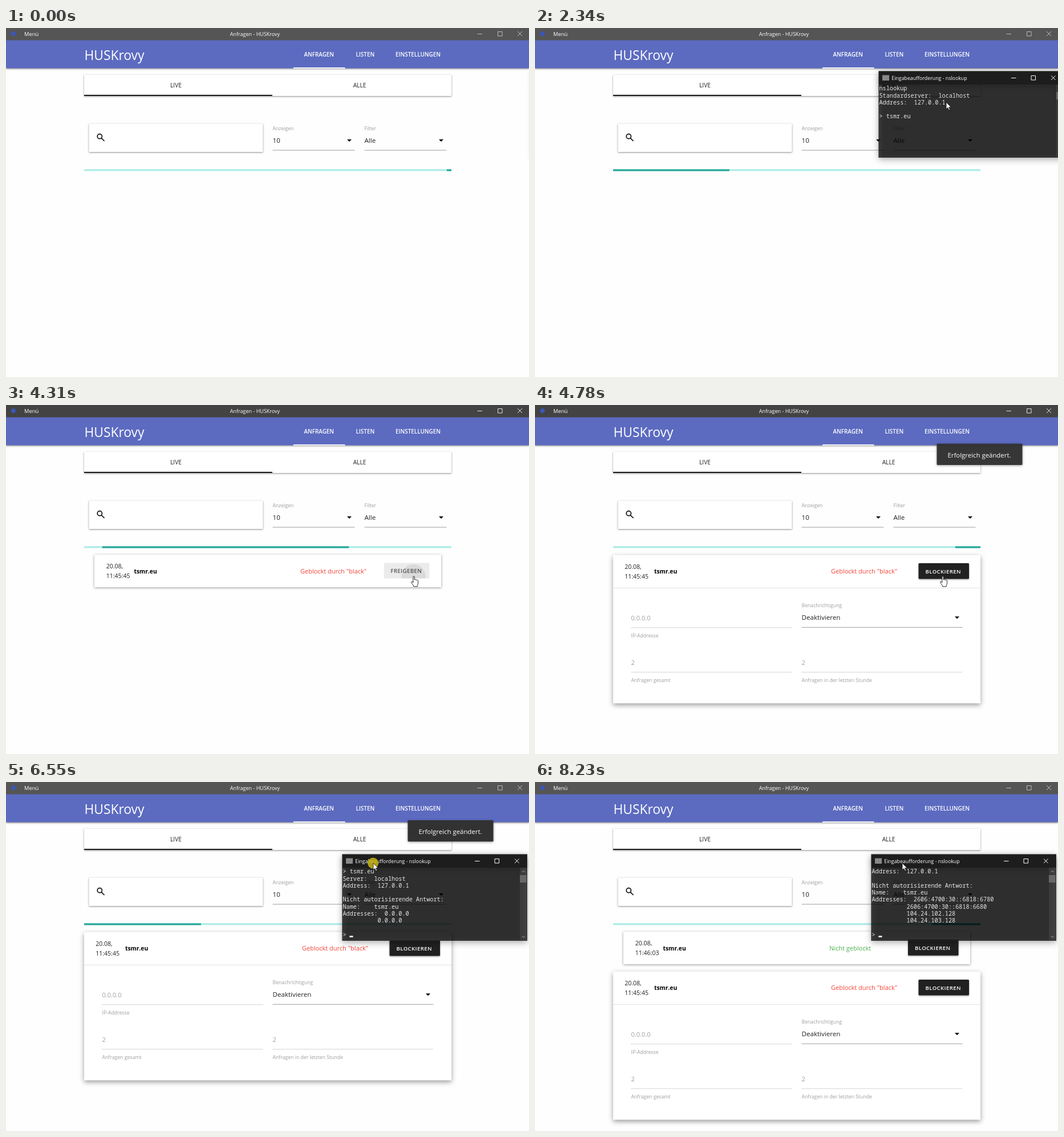
An HTML page that plays this animation: 917 by 611 pixels, repeating every 9.11 s.

```html
<!DOCTYPE html>
<html lang="de">
<head>
<meta charset="utf-8">
<title>Anfragen - HUSKrovy</title>
<style>
  html, body { margin: 0; width: 100%; height: 100%; overflow: hidden; background: #fefefe; }
  #stage { display: block; width: 917px; height: 611px; font: 10.2px "Open Sans", "Noto Sans", sans-serif; fill: #212121; }
  text { white-space: pre; }
  .light, .light text { fill: #fff; }
  .nav { font-size: 9.9px; font-weight: 600; }
  .label { font-size: 8.7px; fill: #9e9e9e; }
  .value { font-size: 11.6px; }
  .muted { font-size: 11px; fill: #9e9e9e; }
  .date { font-size: 10.5px; }
  .domain { font-size: 10.3px; font-weight: 700; fill: #000; }
  .status { font-size: 11px; }
  .button { font-size: 9.8px; letter-spacing: .4px; }
  .button.dark { font-size: 9.6px; font-weight: 600; filter: drop-shadow(0 1px 1.5px rgba(0,0,0,.4)); }
  .paper { fill: #fff; filter: drop-shadow(0 1px 1.5px rgba(0,0,0,.45)); }
  .line { stroke: #9e9e9e; fill: none; }
  .dots { stroke: #aaa; stroke-dasharray: 1 1; fill: none; }
  .icon { stroke: #fff; fill: none; }
  .mono { font: 10.2px "Noto Sans Mono", "DejaVu Sans Mono", monospace; fill: #e6e6e6; }
  #toast { filter: drop-shadow(0 1.5px 2px rgba(0,0,0,.4)); }
  #frame { filter: drop-shadow(0 3px 6px rgba(0,0,0,.45)); }
</style>
</head>
<body>
<svg id="stage" viewBox="0 0 917 611">
  <rect y="21" width="917" height="49.5" fill="#5c6bc0" style="filter:drop-shadow(0 1.2px 1.5px rgba(0,0,0,.5))"/>
  <rect id="titlebar" width="917" height="21.5"/>
  <circle cx="13" cy="10" r="4" fill="#3a57b8"/>
  <g class="light">
    <text x="32" y="13.5" font-size="9.4">Menü</text>
    <text x="436.5" y="13.5" font-size="9" text-anchor="middle">Anfragen - HUSKrovy</text>
    <text x="137.5" y="56" font-size="22.8">HUSKrovy</text>
    <g class="nav">
      <text x="522.5" y="49.7">ANFRAGEN</text>
      <text x="613.5" y="49.7">LISTEN</text>
      <text x="683" y="49.7">EINSTELLUNGEN</text>
    </g>
    <rect x="504" y="69" width="90.5" height="1.8"/>
  </g>
  <path id="controls" class="icon" d="M826.5 10.5h8.5M862.5 6.5h7.5v7.5h-7.5zM897 6l8 8m0-8l-8 8"/>

  <rect class="paper" x="137" y="82" width="644" height="37"/>
  <text x="298" y="104" text-anchor="middle">LIVE</text>
  <text x="620" y="104" text-anchor="middle">ALLE</text>
  <rect x="137" y="117" width="330" height="1.8" fill="#000"/>

  <rect class="paper" x="145.5" y="167.5" width="305" height="49.5"/>
  <g fill="none" stroke="#111" stroke-width="1.7">
    <circle cx="164.3" cy="189.8" r="4.1"/><path d="M167.3 192.8l5.2 5.2"/>
  </g>
  <g id="selects"></g>

  <rect x="137" y="247.2" width="644" height="3.2" fill="#acece6"/>
  <svg x="137" y="247.2" width="644" height="3.2" fill="#26a69a">
    <rect id="long" height="4"/><rect id="short" height="4"/>
  </svg>
  <g id="cards"></g>
  <g id="toast">
    <rect x="704.5" y="67" width="150" height="37.3" rx="1.5" fill="#323232"/>
    <text class="light" x="723.5" y="91" font-size="11.4">Erfolgreich geändert.</text>
  </g>

  <g id="terminal">
    <g id="frame">
      <rect x="-.5" y="23" width="324.5" height="128" fill="#000" fill-opacity=".735"/>
      <rect x="-.5" y="-.5" width="324.5" height="23.5" fill="#1d1d1d"/>
    </g>
    <rect width="323.5" height="150.5" fill="none" stroke="#333" stroke-opacity=".7"/>
    <rect x="6" y="6.5" width="12" height="9.5" fill="#888"/>
    <text class="light" x="22.3" y="14.8" font-size="8.8">Eingabeaufforderung - nslookup</text>
    <path class="icon" d="M232 11.5h8.5M267 7.5h7.5v7.5h-7.5zM302 7.5l7.5 7.5m0-7.5l-7.5 7.5"/>
    <rect x="311" y="23" width="12.5" height="127" fill="#555" fill-opacity=".35"/>
    <rect x="311" y="36" width="11.5" height="13" fill="#686868"/>
    <path class="icon" style="stroke:#aaa" d="M314.5 31l2.7-2.7 2.7 2.7M314.5 142.5l2.7 2.7 2.7-2.7"/>
    <g id="console" class="mono"></g>
    <rect id="caret" width="6.2" height="2.6" fill="#fff"/>
  </g>

  <g id="pointer">
    <circle id="press" cx="-.5" r="9.5" fill="#c8b414" fill-opacity=".85"/>
    <path id="arrow" d="M0 0v12l2.8-2.6 1.9 4.2 1.9-.8-1.9-4.1h3.8z" fill="#fff" stroke="#111" stroke-width=".8"/>
    <path id="hand" d="M-1.2 1c0-1.6 2.4-1.6 2.4 0v5c.4-1 2.2-.9 2.3.3.5-.8 2-.6 2.1.5.6-.6 1.9-.2 1.9 1v4c0 2-1 2.6-1.2 6h-6.6c-.3-2.8-2.6-4.2-4-7-.7-1.4 1.1-2.4 2-1.2l1.1 1.4z" fill="#fff" stroke="#111" stroke-width=".9"/>
  </g>
</svg>
<script>
const LOOP = 9110, STEP = 78.1, LAST = 105 * STEP, BAR_WIDTH = 644;
const el = id => document.getElementById(id);
const set = (node, attrs) => { for (const k in attrs) node.setAttribute(k, attrs[k]); };
const show = (node, on) => { node.style.display = on ? '' : 'none'; };
const move = (node, x, y) => set(node, { transform: `translate(${x} ${y})` });
const clamp = v => Math.max(0, Math.min(1, v));
const lerp = (a, b, p) => a + (b - a) * p;
const smooth = p => p * p * (3 - 2 * p);
const easeOut = p => 1 - (1 - p) ** 3;

function bezier(x1, y1, x2, y2) {
  const at = (a, b, s) => 3 * (1 - s) ** 2 * s * a + 3 * (1 - s) * s * s * b + s ** 3;
  return x => {
    let lo = 0, hi = 1;
    for (let i = 0; i < 24; i++) {
      const mid = (lo + hi) / 2;
      if (at(x1, x2, mid) < x) lo = mid; else hi = mid;
    }
    return at(y1, y2, lo);
  };
}

// Keys are [time, x, y]
function track(keys, t) {
  const i = keys.findIndex(k => k[0] > t);
  if (i === 0) return keys[0].slice(1);
  if (i < 0) return keys[keys.length - 1].slice(1);
  const [a, b] = [keys[i - 1], keys[i]];
  const p = smooth((t - a[0]) / (b[0] - a[0]));
  return [lerp(a[1], b[1], p), lerp(a[2], b[2], p)];
}

const select = (x, y, width, label, value) => `
  <text class="label" x="${x}" y="${y - 35}">${label}</text>
  <text class="value" x="${x}" y="${y - 13}">${value}</text>
  <path class="line" d="M${x} ${y}h${width}"/>
  <path d="M${x + width - 13.5} ${y - 19}h8l-4 4z" fill="#000"/>`;

const field = (x, y, width, value, label) => `
  <text class="muted" x="${x}" y="${y - 13}">${value}</text>
  <path class="dots" d="M${x} ${y}h${width}"/>
  <text class="label" x="${x}" y="${y + 17}">${label}</text>`;

el('selects').innerHTML = select(467.5, 214, 144, 'Anzeigen', '10') + select(628.5, 214, 144, 'Filter', 'Alle');

function addCard(time, status, color) {
  const root = document.createElementNS('http://www.w3.org/2000/svg', 'g');
  root.innerHTML = `
    <rect class="paper"/>
    <g class="date"><text y="24">20.08,</text><text y="41">${time}</text></g>
    <text class="domain" y="32.5">tsmr.eu</text>
    <text class="status" y="32.5" fill="${color}">${status}</text>
    <svg class="button" y="14.2" height="27.5">
      <rect width="100%" height="27.5" rx="1.5"/>
      <circle cx="52" cy="24" fill="#000" fill-opacity=".07"/>
      <text x="12" y="17.5"></text>
    </svg>
    <svg class="details" y="57" width="644">
      <path d="M0 .5h644" stroke="#ddd"/>
      ${field(31.5, 70, 282.5, '0.0.0.0', 'IP-Addresse')}
      ${select(330.5, 69.5, 282, 'Benachrichtigung', 'Deaktivieren')}
      ${field(31.5, 148, 282.5, '2', 'Anfragen gesamt')}
      ${field(330.5, 148, 282, '2', 'Anfragen in der letzten Stunde')}
    </svg>`;
  el('cards').append(root);
  const part = s => root.querySelector(s);
  return { root, paper: part('.paper'), date: part('.date'), domain: part('.domain'), status: part('.status'),
    button: part('.button'), face: part('.button rect'), ripple: part('circle'), caption: part('.button text'),
    details: part('.details') };
}

function drawCard(card, y, open, blocked, hover, ripple) {
  const width = lerp(608, 644, open), buttonWidth = blocked ? 88.5 : 80;
  move(card.root, lerp(155, 137, open), y + open * .8);
  set(card.paper, { width, height: lerp(57, 259.5, open) });
  card.paper.style.filter = `drop-shadow(0 ${1 + 2 * open}px ${2 + 2 * open}px rgba(0,0,0,.4))`;
  move(card.date, lerp(20.8, 20.3, open), 0);
  set(card.domain, { x: lerp(69.5, 72, open) });
  set(card.status, { x: lerp(361, 382, open) });
  set(card.button, { x: lerp(587.5, 624, open) - buttonWidth, width: buttonWidth });
  card.button.classList.toggle('dark', blocked);
  set(card.face, { fill: blocked ? '#212121' : hover ? '#ebebeb' : '#fff' });
  set(card.ripple, { r: blocked ? 0 : ripple });
  set(card.caption, { fill: blocked ? '#fff' : '#212121' });
  card.caption.textContent = blocked ? 'BLOCKIEREN' : 'FREIGEBEN';
  set(card.details, { height: 202.5 * open });
  show(card.details, open > 0);
}

const firstCard = addCard('11:45:45', 'Geblockt durch "black"', '#f44336');
const secondCard = addCard('11:46:03', 'Nicht geblockt', '#4caf50');

const longEase = bezier(.65, .815, .735, .395), shortEase = bezier(.165, .84, .44, 1);
function drawBar(node, time, ease, left, right) {
  const p = ease(clamp(time / 1260));
  const start = lerp(left[0], left[1], p), end = 100 - lerp(right[0], right[1], p);
  set(node, { x: start / 100 * BAR_WIDTH, width: (end - start) / 100 * BAR_WIDTH });
}

// The bar runs slightly fast and jumps at the two cuts
function drawProgress(t) {
  const phase = (t * 1.012 + (t < 4280 ? 2005 : t < 6180 ? 1292 : 1938)) % 2100;
  drawBar(el('long'), phase, longEase, [-35, 100], [100, -90]);
  drawBar(el('short'), (phase + 950) % 2100, shortEase, [-200, 107], [100, -8]);
}

const INTRO = ['nslookup', 'Standardserver:  localhost', 'Address:  127.0.0.1', ''];
const QUERY = '> tsmr.eu', PROMPT = '> ', INDENT = ' '.repeat(10);
const reply = addresses => ['Server:  localhost', 'Address:  127.0.0.1', '', 'Nicht autorisierende Antwort:',
  'Name:    tsmr.eu', ...addresses.map((a, i) => (i ? INDENT : 'Addresses:  ') + a), ''];
const BLOCKED = reply(['0.0.0.0', '0.0.0.0']);
const ALLOWED = reply(['2606:4700:30::6818:6780', '2606:4700:30::6818:6680', '104.24.102.128', '104.24.103.128']);
const ROWS = 10, ROW_HEIGHT = 12.25, CHAR_WIDTH = 6.135;
el('console').innerHTML = Array.from({ length: ROWS }, (_, i) => `<text x=".5" y="${33.3 + i * ROW_HEIGHT}"></text>`).join('');

function drawConsole(t) {
  const lines = [...INTRO, QUERY];
  if (t >= 2600) lines.push(...BLOCKED, t < 6850 ? PROMPT : QUERY);
  if (t >= 7150) lines.push(...ALLOWED, PROMPT);
  const visible = lines.slice(-ROWS);
  [...el('console').children].forEach((row, i) => row.textContent = visible[i] || '');
  set(el('caret'), { x: visible[visible.length - 1].length * CHAR_WIDTH, y: 32 + (visible.length - 1) * ROW_HEIGHT });
  const waiting = (t > 2030 && t < 2600) || (t > 7000 && t < 7150);
  show(el('caret'), !waiting);
}

const WINDOW_PATH = [[90, 925, 73], [937, 660, 81], [1550, 603, 76], [2950, 603, 76], [3420, 930, 85], [5850, 930, 135], [6320, 590, 127]];
const POINTER_PATH = [[1550, 725, 95], [1900, 721, 130], [2750, 721, 130], [2950, 725, 95], [3420, 960, 180],
  [3780, 765, 285], [4000, 715, 300], [5200, 715, 300], [5500, 960, 280], [6600, 644, 142]];
// [from, until, grab x, grab y]
const DRAGS = [[0, 1550, 122, 19], [2950, 3420, 122, 19], [5850, 6700, 54, 15]];

function drawPointer(t) {
  const [wx, wy] = track(WINDOW_PATH, t);
  move(el('terminal'), wx, wy);
  const drag = DRAGS.find(d => t >= d[0] && t < d[1]);
  const [x, y] = drag ? [wx + drag[2], wy + drag[3]] : track(POINTER_PATH, t);
  const overButton = t > 3900 && t < 5300;
  move(el('pointer'), x, y);
  show(el('press'), drag);
  show(el('arrow'), !overButton);
  show(el('hand'), overButton);
}

function drawToast(t) {
  const enter = easeOut(clamp((t - 4550) / 300)), leave = easeOut(clamp((t - 7750) / 375));
  move(el('toast'), 0, 27 * (1 - enter) - 30 * leave);
  set(el('toast'), { opacity: enter * (1 - leave) });
}

function draw(now) {
  // The picture advances in even steps and rests at the end of the loop
  const t = Math.min(LAST, Math.floor((now % LOOP + 15) / STEP) * STEP);
  const active = t > 4280 && t < 5850, listed = t >= 7750;
  set(el('titlebar'), { fill: active ? '#434343' : '#555' });
  set(el('controls'), { 'stroke-opacity': active ? .85 : .6 });
  drawProgress(t);
  show(firstCard.root, t >= 2960);
  show(secondCard.root, listed);
  drawCard(firstCard, 262 + (listed ? 69 : 0), smooth(clamp((t - 4390) / 350)), t >= 4500, t >= 3900, Math.max(0, (t - 4200) / 4.5));
  drawCard(secondCard, 262, 0, true, false, 0);
  drawToast(t);
  drawConsole(t);
  drawPointer(t);
}

const startTime = performance.now();
function tick() {
  draw(performance.now() - startTime);
  requestAnimationFrame(tick);
}
tick();
</script>
</body>
</html>
```
